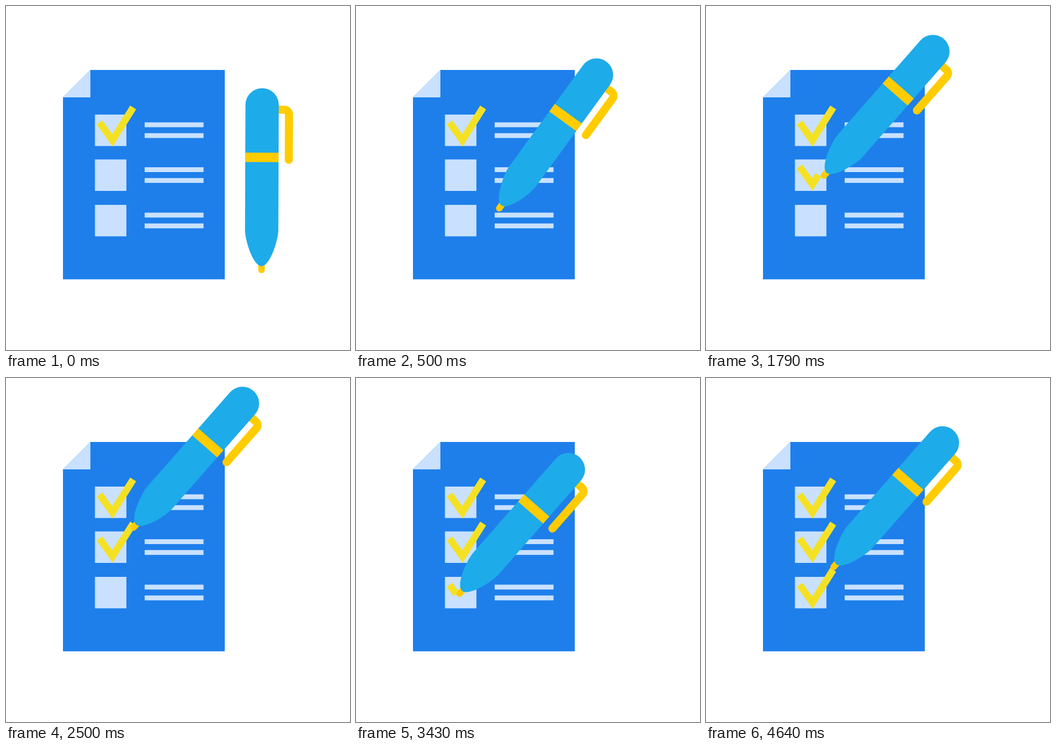
An HTML page for the animation above (6 s loop, 640 by 640 pixels).

```html
<!DOCTYPE html>
<html lang="en">
<head>
<meta charset="utf-8">
<title>Checklist</title>
<style>
  html, body { margin: 0; width: 100%; height: 100%; overflow: hidden; background: #fff; }
  svg { display: block; width: 100%; height: 100%; }
</style>
</head>
<body>
<svg viewBox="0 0 640 640">
  <path fill="#1e7feb" d="M157 119H407V508.5H106V170Z"/>
  <path fill="#c9e1ff" d="M157 119V170H106Z"/>
  <g id="rows" fill="#c9e1ff"></g>
  <g id="checks" fill="none" stroke="#f5e123" stroke-width="13" stroke-miterlimit="10"></g>
  <g id="pen">
    <path d="M20 -298H41.5a8.5 8.5 0 0 1 8.5 8.5V-205" fill="none" stroke="#fc0" stroke-width="15" stroke-linecap="round"/>
    <path d="M0 -14V0" stroke="#fc0" stroke-width="12" stroke-linecap="round"/>
    <path d="M-31 -307A31 31 0 0 1 31 -307V-74C31 -56 16 -7 0 -7S-31 -56 -31 -74Z" fill="#1eabea"/>
    <path d="M-31 -218H31V-200.5H-31Z" fill="#fc0"/>
  </g>
</svg>
<script>
const FPS = 14, LOOP = 6000, LAST = 83;
const REST_ANGLE = 0.2, WRITE_ANGLE = 41.25, TURN_END = 8;
const PIVOT = [13.5, -166];          // turning point, seen from the pen tip
const WRITE_OFFSET = [119.6, -115.9]; // the same point once the pen is tilted

const $ = id => document.getElementById(id);
const clamp01 = v => Math.min(1, Math.max(0, v));

// One check mark written by the pen: [step, tip x, tip y]
const STROKE = [[13, 181, 309.5], [16, 189, 323], [19, 200, 337], [22, 213, 329.5], [33, 237.5, 278]];
const later = (keys, steps, dy) => keys.map(([k, x, y]) => [k + steps, x, y + dy]);
const PATH = [
  [2, 369.9, 440.9], [7, 255.6, 366.2], [11, 181, 309.5],
  ...STROKE,
  [40, 237.5, 278],
  ...later(STROKE, 31, 73.5)
];

// Vertical shift of each check mark and the steps during which it is drawn
const CHECKS = [
  { dy: 0, from: -1, to: 0 },
  { dy: 82, from: 13, to: 35 },
  { dy: 168, from: 44, to: 65 }
];
const ARMS = [[174, 216.8], [198, 250], [236.6, 188.7]];
const armLength = i => Math.hypot(ARMS[i + 1][0] - ARMS[i][0], ARMS[i + 1][1] - ARMS[i][1]);

const rect = (x, y, w, h) => `<rect x="${x}" y="${y}" width="${w}" height="${h}"/>`;
$('rows').innerHTML = [202, 285.5, 370].map(y =>
  rect(165.5, y, 58.5, 58.5) + rect(258, y + 14.5, 109.5, 9) + rect(258, y + 34.6, 109.5, 9)
).join('');
$('checks').innerHTML = CHECKS.map(c => `<path transform="translate(0 ${c.dy})"/>`).join('');
const marks = [...$('checks').children];

function along(keys, step) {
  if (step <= keys[0][0]) return keys[0].slice(1);
  for (let i = 1; i < keys.length; i++) {
    const [k0, x0, y0] = keys[i - 1], [k1, x1, y1] = keys[i];
    if (step <= k1) {
      const p = (step - k0) / (k1 - k0);
      return [x0 + (x1 - x0) * p, y0 + (y1 - y0) * p];
    }
  }
  return keys[keys.length - 1].slice(1);
}

function checkPath(progress) {
  let left = progress * (armLength(0) + armLength(1));
  if (left <= 0) return '';
  let d = 'M' + ARMS[0];
  for (let i = 0; i < 2 && left > 0; i++) {
    const p = Math.min(1, left / armLength(i));
    d += 'L' + ARMS[i].map((v, axis) => v + (ARMS[i + 1][axis] - v) * p);
    left -= armLength(i);
  }
  return d;
}

function draw(ms) {
  const step = Math.min(LAST, Math.floor((ms + 5) * FPS / 1000));
  const angle = REST_ANGLE + (WRITE_ANGLE - REST_ANGLE) * clamp01(step / TURN_END);
  const [x, y] = along(PATH, step);
  $('pen').setAttribute('transform',
    `translate(${x + WRITE_OFFSET[0]} ${y + WRITE_OFFSET[1]}) rotate(${angle}) translate(${-PIVOT[0]} ${-PIVOT[1]})`);
  CHECKS.forEach((c, i) =>
    marks[i].setAttribute('d', checkPath(clamp01((step - c.from) / (c.to - c.from)))));
}

const start = performance.now();
function tick() {
  draw((performance.now() - start) % LOOP);
  requestAnimationFrame(tick);
}
tick();
</script>
</body>
</html>
```
